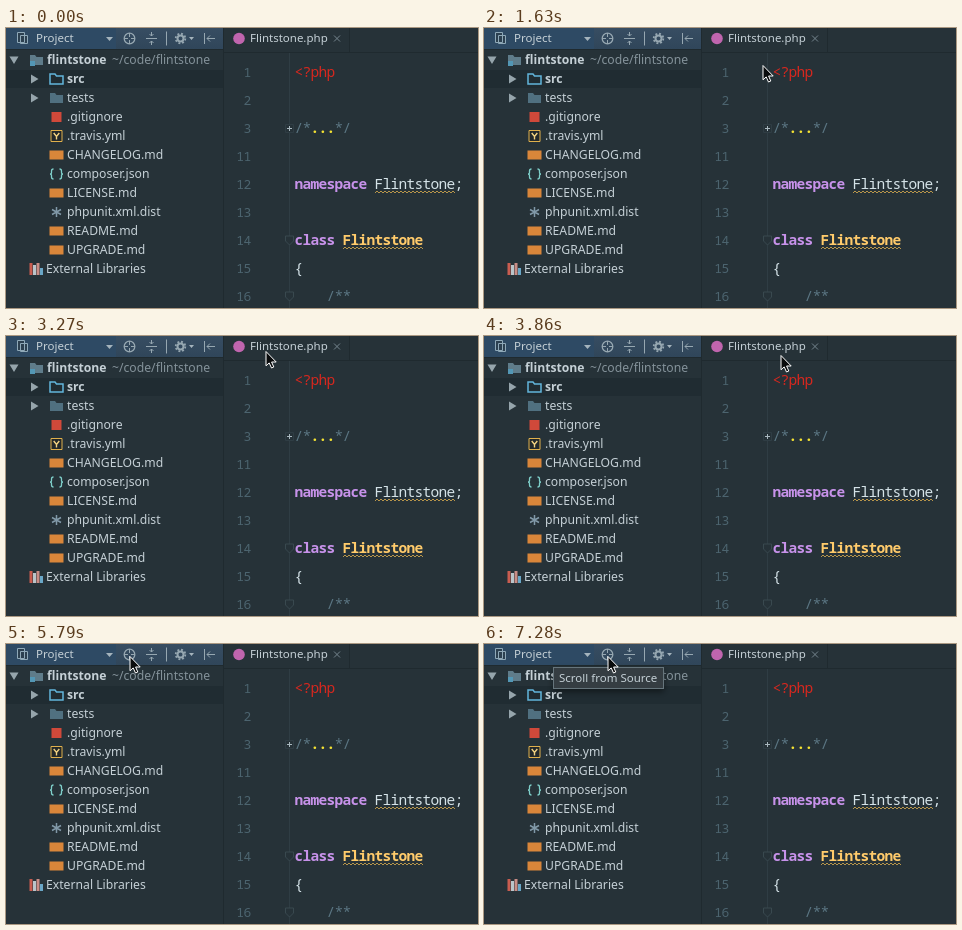
Recreate the animation shown at these times as an HTML page. Size 472x280 px, loop 8 s.

```html
<!DOCTYPE html>
<html lang="en">
<head>
<meta charset="utf-8">
<title>Project panel</title>
<style>
html, body { margin: 0; width: 100%; height: 100%; overflow: hidden; background: #263238; }
svg { display: block; width: 472px; height: 280px; }
text { font: 12.2px "Noto Sans", "Open Sans", sans-serif; fill: #c5d0d6; white-space: pre; }
.small { font-size: 11.5px; }
.code text { font: 14.5px "Noto Sans Mono", "DejaVu Sans Mono", monospace; letter-spacing: -.7px; }
.code .num { font-size: 13px; letter-spacing: -.4px; fill: #4c646f; text-anchor: end; }
.bold, .code .bold { font-weight: bold; }
.dim { fill: #84929a; }
.line { fill: none; stroke: #96a7b1; }
</style>
</head>
<body>
<svg viewBox="0 0 472 280">
  <defs>
    <linearGradient id="bar" x2="0" y2="1">
      <stop stop-color="#374d62"/><stop offset="1" stop-color="#30465a"/>
    </linearGradient>
    <filter id="shade" x="-10%" y="-40%" width="120%" height="200%">
      <feDropShadow dx="0" dy="3" stdDeviation="3" flood-opacity=".45"/>
    </filter>
  </defs>

  <rect width="472" height="280" fill="#263238"/>
  <rect width="217" height="21" fill="url(#bar)"/>
  <rect width="110" height="21" fill="#2e4a64"/>
  <rect y="42" width="217" height="18" fill="#202c32"/>
  <path d="M217.500 0V280M0 21.500H217M217 24.500H472M343.500 0V24" fill="none" stroke="#1f2a2f"/>
  <path d="M283.500 25V280" stroke="#2f3d44"/>

  <g id="header">
    <path d="M11.500 4.500h7v10h-7zM14.500 7.500h7v8h-7z" fill="#2c4050" stroke="#8fa9b8"/>
    <text x="30" y="14" class="small">Project</text>
    <path d="M100 9h7l-3.500 4zM183 9h5l-2.500 3z" fill="#a5b4bd"/>
    <g class="line">
      <circle cx="123.500" cy="10.500" r="5.300" stroke-width="1.300"/>
      <path d="M123.500 5v4M123.500 12v4M118 10.500h4M125 10.500h4"/>
      <path d="M140 10.500h11M145.500 4v4M145.500 13v4M143.500 6l2 2 2-2M143.500 15l2-2 2 2"/>
      <path d="M160.500 3.500v14"/>
      <circle cx="174.500" cy="10.500" r="3" stroke-width="2"/>
      <circle cx="174.500" cy="10.500" r="4.800" stroke-width="1.800" stroke-dasharray="1.900 1.870"/>
      <path d="M198.500 5v11M201 10.500h8M204 7.500l-3 3 3 3"/>
    </g>
  </g>

  <g id="tree"></g>

  <circle cx="233" cy="10.500" r="5.800" fill="#c065ae"/>
  <text x="244" y="14" class="small">Flintstone.php</text>
  <path class="line" d="M328 7.500l6 6m0-6l-6 6" style="stroke:#75858e"/>

  <g id="code" class="code"></g>

  <g id="tip" filter="url(#shade)">
    <rect x="69.500" y="23.500" width="110" height="21" fill="#343d42" stroke="#66747b"/>
    <text x="75" y="38" class="small">Scroll from Source</text>
  </g>
  <path id="cursor" d="M0 .5V14.800L3.200 11.900 5.500 17 7.800 16 5.600 11H10.200z"
        fill="#0a0c0d" stroke="#fff" stroke-linejoin="round"/>
</svg>
<script>
const $ = id => document.getElementById(id);
const text = (x, y, s, attrs = "") => `<text x="${x}" y="${y}" ${attrs}>${s}</text>`;
const rect = (x, y, w, h, fill) => `<rect x="${x}" y="${y}" width="${w}" height="${h}" fill="${fill}"/>`;
const path = (d, attrs) => `<path d="${d}" ${attrs}/>`;

// Icons, drawn around the middle of their row
const folder = "M-6.500-5h5l1.500 2h6.500v8h-13z";
const icons = {
  root: path(folder, 'fill="#5f7c8a"') + rect(-6.5, 1, 5, 5, "#5397b5"),
  src: path(folder, 'fill="none" stroke="#62b5dc" stroke-width="1.5"'),
  dir: path(folder, 'fill="#507080"'),
  git: rect(-5, -5, 10, 10, "#d0493a"),
  yml: path("M-5.500-5.500h11v11h-11z", 'fill="#22282a" stroke="#dfb04c"') +
    path("M-2.800-3L0 .5 2.800-3M0 .5V3.500", 'fill="none" stroke="#f3d382" stroke-width="1.4"'),
  md: rect(-7, -4.5, 14, 9, "#d9863a"),
  json: path("M-3-5q-2 0-2 2v1.500q0 1.500-1.500 1.500 1.500 0 1.500 1.500V3q0 2 2 2M3-5q2 0 2 2v1.500q0 1.500 1.500 1.500-1.500 0-1.500 1.500V3q0 2-2 2",
    'fill="none" stroke="#7fd0cb" stroke-width="1.3"'),
  star: path("M0-5V5M-4.500-2.500l9 5M-4.500 2.500l9-5", 'stroke="#8199a8" stroke-width="1.5"'),
  libs: rect(-7, -6, 3, 12, "#c95d50") + rect(-3.5, -4, 3, 10, "#b9c5ca") +
    rect(0, -6, 3, 12, "#c98d86") + rect(3.5, -1, 3, 7, "#6aa7c7")
};

// icon, label, left edge, class
const rows = [
  ["root", "flintstone", 24, "bold"], ["src", "src", 44, "bold"], ["dir", "tests", 44],
  ["git", ".gitignore", 44], ["yml", ".travis.yml", 44], ["md", "CHANGELOG.md", 44],
  ["json", "composer.json", 44], ["md", "LICENSE.md", 44], ["star", "phpunit.xml.dist", 44],
  ["md", "README.md", 44], ["md", "UPGRADE.md", 44], ["libs", "External Libraries", 24]
];
$("tree").innerHTML = rows.map(([icon, label, x, kind = ""], i) => {
  const y = 32 + i * 19;
  return `<g transform="translate(${x + 6.5} ${y})">${icons[icon]}</g>` +
    text(x + 17 - (icon == "libs"), y + 4, label, `class="${kind}"`);
}).join("") + text(106, 36, "~/code/flintstone", 'class="dim"') +
  path("M3.500 28.500h9l-4.500 7.500zM25 46.500v9l7.500-4.500zM25 65.500v9l7.500-4.500z", 'fill="#96a5ac"');

// Code: row, column, colour, text, class
const grey = "#5b7683", purple = "#c792ea", pale = "#d5e3e8", gold = "#ffcb6b";
const words = [
  [0, 0, "#d5281f", "&lt;?php"],
  [2, 0, grey, "/*"], [2, 2, "#f4e233", "...", "bold"], [2, 5, grey, "*/"],
  [4, 0, purple, "namespace", "bold"], [4, 10, pale, "Flintstone;"],
  [6, 0, purple, "class", "bold"], [6, 6, gold, "Flintstone", "bold"],
  [7, 0, pale, "{"], [8, 4, grey, "/**"]
];
const wave = (x, y) => path(`M${x} ${y}` + "l2-2 2 2".repeat(20), 'fill="none" stroke="#c9a24f" stroke-width=".9"');
const shield = y => path(`M279.500 ${y - 4}h8v5l-4 4-4-4z`, 'fill="#263238" stroke="#39494f"');
$("code").innerHTML =
  [1, 2, 3, 11, 12, 13, 14, 15, 16].map((n, i) => text(245, 49 + i * 28, n, 'class="num"')).join("") +
  words.map(([row, col, fill, s, kind = ""]) =>
    text(288.5 + col * 8, 49 + row * 28, s, `class="${kind}" style="fill:${fill}"`)).join("") +
  wave(369, 165) + wave(337, 221) + shield(212) + shield(268) +
  path("M279.500 96.500h8v8h-8z", 'fill="#263238" stroke="#2f3d44"') +
  path("M281 100.500h5M283.500 98v5", 'stroke="#a9b8bf"');

const TICK = 147.5, LOOP = 8000;
const strokes = [
  [1040, [425, 36], [371, 38], [325, 40], [295, 39], [279, 37], [272, 32], [271, 25], [272, 20]],
  [2220, [279, 20], [291, 19], [303, 18], [309, 18], [301, 18], [285, 17], [270, 17]],
  [3270, [260, 15], [257, 14], [270, 16], [287, 18], [297, 19]],
  [4610, [288, 20], [263, 21], [230, 21], [198, 21], [171, 19], [149, 16], [136, 13], [129, 15], [124, 12]]
];

function draw(now) {
  const t = now % LOOP;
  const stroke = strokes.filter(s => s[0] <= t).pop();
  $("cursor").style.display = stroke ? "" : "none";
  if (stroke) {
    const [start, ...points] = stroke;
    const i = Math.min(points.length - 1, Math.floor((t - start + 4) / TICK));
    $("cursor").setAttribute("transform", `translate(${points[i]})`);
  }
  $("tip").style.opacity = t < 7130 ? 0 : t < 7280 ? .5 : 1;
}

const begin = performance.now();
function tick() {
  draw(performance.now() - begin);
  requestAnimationFrame(tick);
}
tick();
</script>
</body>
</html>
```
